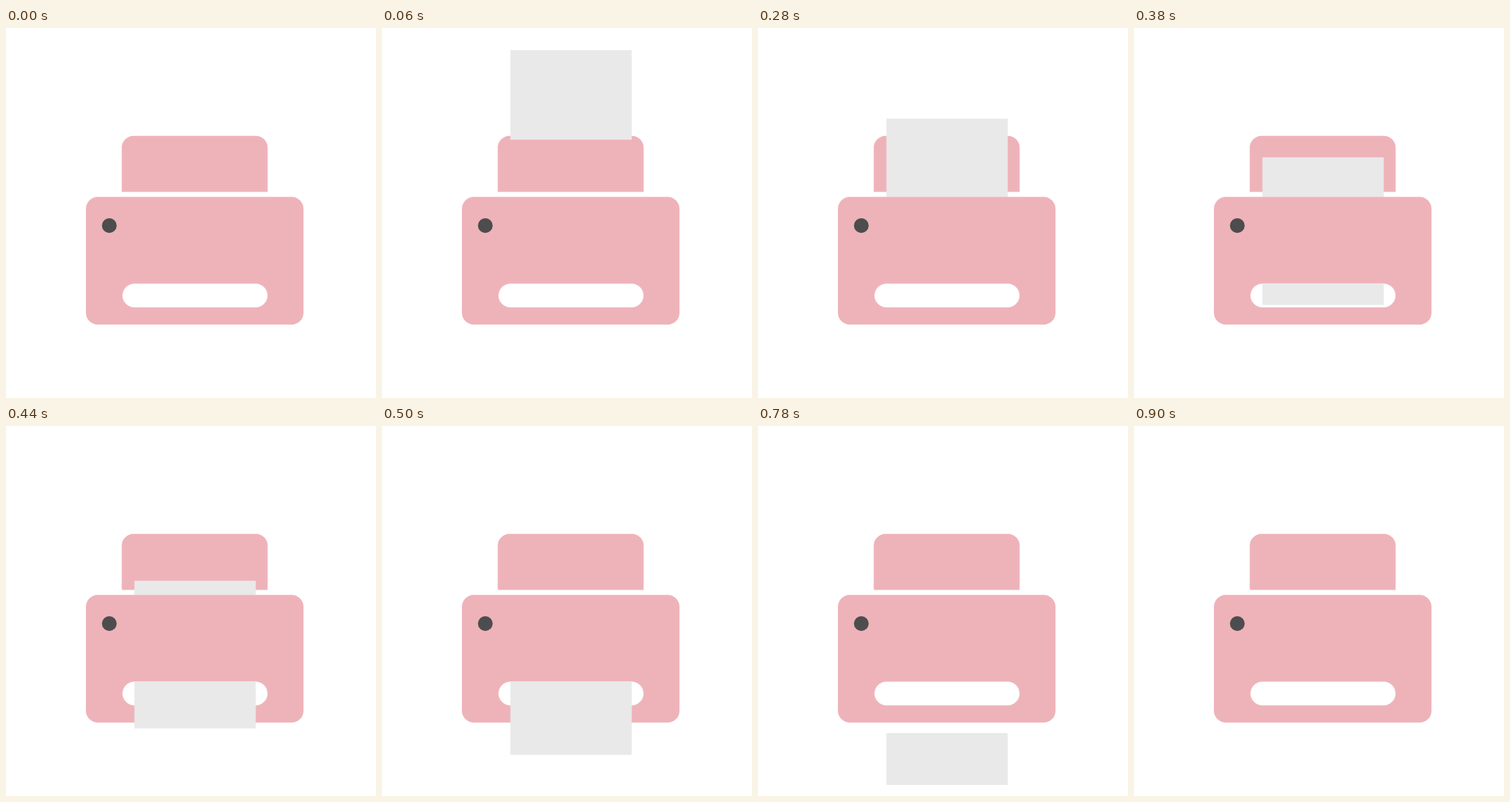
Animation, 500 px wide and 500 px high, one loop 1.2 s. Source, as an HTML page with a canvas:

```html
<!DOCTYPE html>
<html lang="en">
<head>
<meta charset="utf-8">
<title>Printer</title>
<style>
html, body { margin: 0; width: 100%; height: 100%; overflow: hidden; background: #fff; }
canvas { display: block; width: 500px; height: 500px; }
</style>
</head>
<body>
<canvas id="stage"></canvas>
<script>
const LOOP = 1200, STEP = 20;
const PINK = '#eeb3b9', PAPER = '#e9e9e9', DARK = '#4d4d4d';
const SHEET = { x: 173.5, w: 164, h: 199.5, grow: 99 };

const canvas = document.getElementById('stage');
const ctx = canvas.getContext('2d');
const dpr = window.devicePixelRatio || 1;
canvas.width = canvas.height = 500 * dpr;
ctx.scale(dpr, dpr);

function box(x, y, w, h, radius, color) {
  ctx.fillStyle = color;
  ctx.beginPath();
  ctx.roundRect(x, y, w, h, radius);
  ctx.fill();
}

// Top edge of the sheet: its speed rises smoothly from slow to fast.
function sheetTop(t) {
  const start = 30, span = 500, slow = 0.37, gain = 0.237;
  const u = Math.min(1, Math.max(0, (t - start) / span));
  const late = Math.max(0, t - start - span);
  return 7.8 + slow * t + gain * (span * (u ** 3 - u ** 4 / 2) + late);
}

// The part of the sheet visible between two heights.
function sheet(t, from, to) {
  const y = sheetTop(t);
  const top = Math.max(from, y);
  const bottom = Math.min(to, y + SHEET.h * Math.min(1, t / SHEET.grow));
  if (bottom <= top) return;
  ctx.fillStyle = PAPER;
  ctx.fillRect(SHEET.x, top, SHEET.w, bottom - top);
}

function draw(t) {
  ctx.fillStyle = '#fff';
  ctx.fillRect(0, 0, 500, 500);
  box(156.4, 145.8, 197.2, 75.7, [16, 16, 0, 0], PINK);
  sheet(t, 0, 228.3);
  box(108, 228.2, 294, 172.6, 16, PINK);
  box(129.6, 257, 20, 20, 10, DARK);
  box(157.4, 345.5, 196, 32, 16, '#fff');
  sheet(t, 345.2, 485);
}

let begin = null;
function frame(now) {
  if (begin === null) begin = now;
  const t = (now - begin) % LOOP;
  draw(Math.floor(t / STEP + 1e-4) * STEP);
  requestAnimationFrame(frame);
}
draw(0);
requestAnimationFrame(frame);
</script>
</body>
</html>
```
